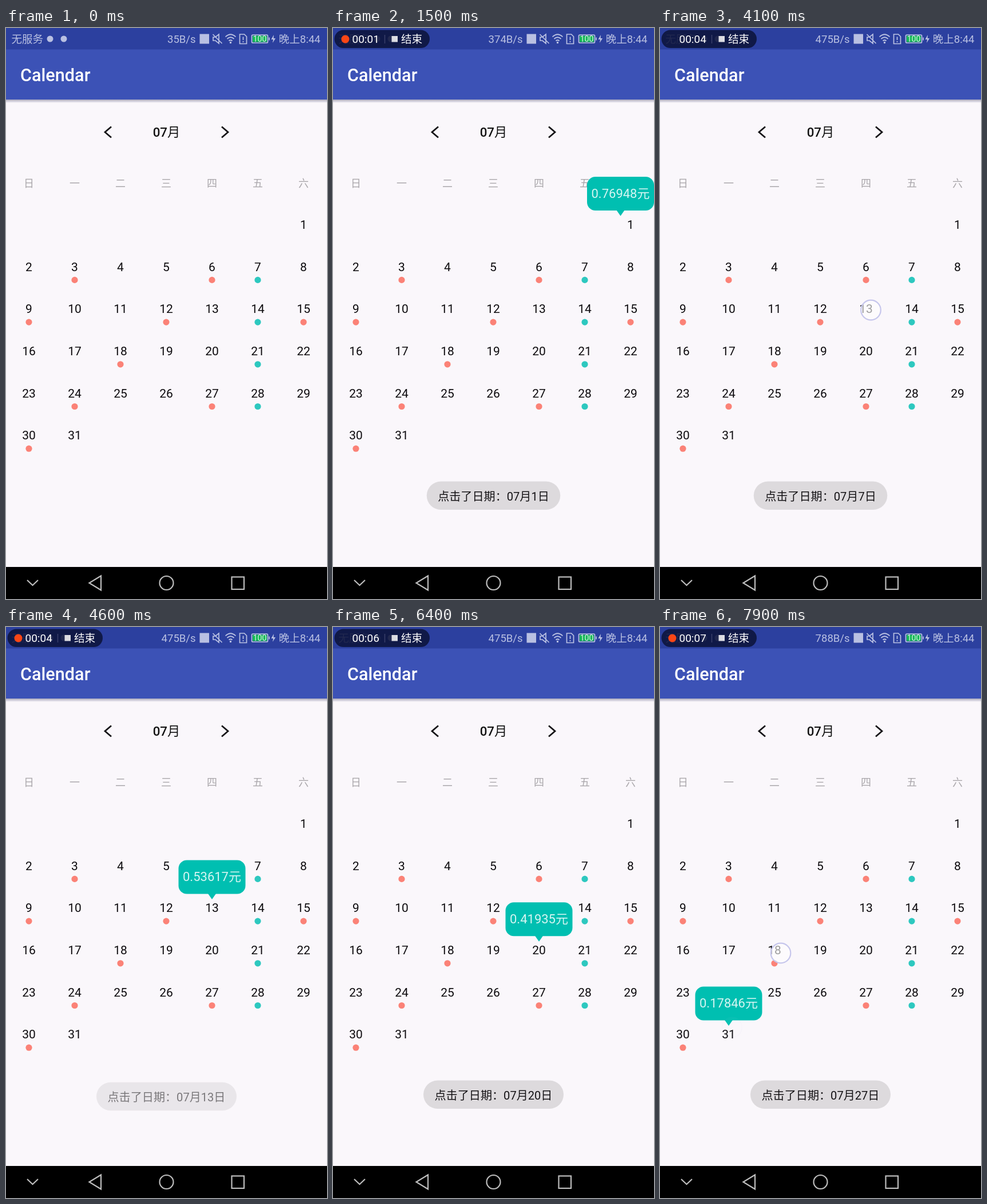
Recreate the animation shown at these times as an HTML page. Size 561 by 998 pixels, loop 8 s.

```html
<!DOCTYPE html>
<html lang="zh-CN">
<head>
<meta charset="utf-8">
<title>Calendar</title>
<style>
  html, body { margin: 0; width: 100%; height: 100%; overflow: hidden; background: #faf7fb; }
  svg { display: block; width: 100vw; height: 100vh; }
  text { font-family: Roboto, "Noto Sans CJK SC", "Noto Sans CJK", sans-serif; }
  .mid { text-anchor: middle; }
  .end { text-anchor: end; }
  .line { fill: none; stroke: #bcc3e4; stroke-width: 1.7; }
  .nav { fill: none; stroke: #bdbdbd; stroke-width: 2.2; }
  .arrow { fill: none; stroke: #161418; stroke-width: 2.8; }
  .status { font-size: 18.5px; fill: #b9c0e2; }
</style>
</head>
<body>
<svg viewBox="0 0 561 998" xmlns="http://www.w3.org/2000/svg">
  <defs>
    <linearGradient id="shade" x2="0" y2="1">
      <stop stop-color="#8f8da6" stop-opacity=".75"/>
      <stop offset="1" stop-color="#8f8da6" stop-opacity="0"/>
    </linearGradient>
  </defs>
  <rect width="561" height="998" fill="#faf7fb"/>
  <rect y="125" width="561" height="6" fill="url(#shade)"/>
  <rect y="37" width="561" height="88" fill="#3c52b6"/>
  <rect width="561" height="37.5" fill="#2c409f"/>

  <g class="status">
    <text x="9.500" y="26">无服务</text>
    <circle cx="77" cy="19" r="5.500"/>
    <circle cx="101" cy="19" r="5.500"/>
    <text id="speed" class="end" x="331.500" y="26"></text>
    <rect x="338.500" y="10.500" width="16.500" height="17"/>
    <text class="end" x="549.500" y="26">晚上8:44</text>
  </g>
  <g class="line">
    <path d="M362 16h4l6-5v16l-6-5h-4zM361.500 11l16 16"/>
    <path d="M383.500 15.500q9-8.500 18 0M386.500 19q6-5.500 12 0M389.500 22.500q3-2.500 6 0"/>
    <circle cx="392.500" cy="25.500" r=".9"/>
    <path d="M408.500 11h8l4 4v12.500h-12zM414.500 15.500v5.500M414.500 23v2"/>
    <rect x="429.500" y="12" width="28" height="14" rx="2"/>
    <path d="M460 16.500v5"/>
  </g>
  <rect x="431" y="13.500" width="25" height="11" fill="#15b857"/>
  <text class="mid" x="443.500" y="24" font-size="14" fill="#d9f3e3">100</text>
  <path d="M468 12l-4.500 8h3.500l-1 6 5-8h-3.500z" fill="#bcc3e4"/>

  <text x="25" y="93" font-size="30.600" font-weight="500" fill="#fff">Calendar</text>
  <path class="arrow" d="M184 172.500L173 182l11 9.500M377 172.500L388 182l-11 9.500"/>
  <text class="mid" x="280.500" y="190" font-size="22.300" font-weight="500" fill="#111">07月</text>
  <g id="days"></g>

  <g id="toast">
    <rect id="toastBox" y="792.500" height="49.500" rx="24.700" fill="#dddadd"/>
    <text id="toastText" class="mid" x="280.500" y="825.500" font-size="20.100" fill="#141215"></text>
  </g>
  <g id="bubble">
    <rect width="117" height="59" rx="14.500" fill="#00bfb1"/>
    <path d="M51.500 58.500h14l-7 10z" fill="#00bfb1"/>
    <text id="amount" class="mid" x="58.500" y="36.500" font-size="22" fill="#d6f5f2"></text>
  </g>

  <rect y="942" width="561" height="56"/>
  <g class="nav">
    <path d="M37 965l9.500 9 9.500-9M166 957.500v25L145.500 970z"/>
    <circle cx="280.500" cy="970" r="12"/>
    <rect x="394.500" y="959.500" width="21.500" height="21.500"/>
  </g>

  <g id="recorder">
    <rect x="2.500" y="3.500" width="166.500" height="31.500" rx="15.700" fill="#0d143c" opacity=".88"/>
    <circle id="recDot" cx="21.500" cy="19.500" r="7" fill="#fa4616"/>
    <text id="clock" x="33.500" y="26" font-size="19" fill="#fff"></text>
    <path d="M90.500 12v15" stroke="#39406a" stroke-width="1.500"/>
    <rect x="102.500" y="14" width="10.500" height="10.500" fill="#dcdce2"/>
    <text x="119" y="26" font-size="18.600" fill="#fff">结束</text>
  </g>
  <g id="touches"></g>
</svg>
<script>
const LOOP = 8000;
const FIRST_COLUMN = 6;
const $ = id => document.getElementById(id);

// Day taps open a bubble that stays until the next outside press.
const bubbles = [
  { day: 1, amount: '0.76948', from: 950, to: 2000 },
  { day: 7, amount: '0.20162', from: 2800, to: 3300 },
  { day: 13, amount: '0.53617', from: 4200, to: 5150 },
  { day: 20, amount: '0.41935', from: 6000, to: 6450 },
  { day: 27, amount: '0.87862', from: 7030, to: 7350 },
  { day: 31, amount: '0.17846', from: 7690, to: LOOP + 200 }
];
const toasts = [
  { day: 1, from: 950, to: 2650 },
  { day: 7, from: 3000, to: 4200 },
  { day: 13, from: 4490, to: 5720 },
  { day: 20, from: 6020, to: 6930 },
  { day: 27, from: 7230, to: LOOP + 200 }
];
const touches = [
  { x: 522, y: 346, from: 780, to: 950 },
  { x: 158, y: 967, from: 1880, to: 2050 },
  { x: 438, y: 421, from: 2600, to: 2800 },
  { x: 449, y: 440, from: 3300, to: 3480 },
  { x: 368.5, y: 493, from: 3960, to: 4200 },
  { x: 373, y: 442, from: 5130, to: 5302 },
  { x: 368, y: 568, from: 5800, to: 6000 },
  { x: 372, y: 520, from: 6430, to: 6560 },
  { x: 366, y: 641, from: 6820, to: 7030 },
  { x: 372, y: 600, from: 7300, to: 7400 },
  { x: 126, y: 700, from: 7550, to: 7690 },
  { x: 211, y: 570, from: 7780, to: LOOP + 100 }
];
const ticks = [200, 1000, 1950, 2950, 4050, 5100, 6100, 7150];
const speeds = [[0, 35], [1000, 374], [4000, 475], [7000, 788]];

const clamp = v => Math.max(0, Math.min(1, v));
const envelope = (t, { from, to }, rise, fall) =>
  Math.min(clamp((t - from) / rise), clamp(1 - (t - to) / fall));
const cell = day => {
  const index = day - 1 + FIRST_COLUMN;
  return { x: 40 + 80 * (index % 7), y: 343.3 + 73.7 * Math.floor(index / 7) };
};

function add(parent, tag, attrs, text = '') {
  const node = document.createElementNS('http://www.w3.org/2000/svg', tag);
  for (const key in attrs) node.setAttribute(key, attrs[key]);
  node.textContent = text;
  return parent.appendChild(node);
}

function setText(id, value) {
  const node = $(id);
  if (node.textContent !== value) node.textContent = value;
}

[...'日一二三四五六'].forEach((name, i) =>
  add($('days'), 'text', { class: 'mid', x: 40 + 80 * i, y: 277.5, 'font-size': 18, fill: '#a9a6aa' }, name));

for (let day = 1; day <= 31; day++) {
  const { x, y } = cell(day);
  add($('days'), 'text', { class: 'mid', x, y: y + 7.5, 'font-size': 21, fill: '#0c0a0d' }, day);
  const color = day % 7 === 0 ? '#2dc8bf' : day % 3 === 0 ? '#fb8277' : null;
  if (color) add($('days'), 'circle', { cx: x, cy: y + 23.4, r: 5.6, fill: color });
}

for (const touch of touches) {
  touch.node = add($('touches'), 'circle', {
    cx: touch.x, cy: touch.y, r: 17.3, fill: '#fff', 'fill-opacity': 0.6, stroke: '#c6c6ec', 'stroke-width': 2.2
  });
}

function drawBubble(t) {
  const item = bubbles.find(b => t >= b.from && t < b.to + 60);
  $('bubble').setAttribute('opacity', item ? envelope(t, item, 50, 60) : 0);
  if (!item) return;
  const { x, y } = cell(item.day);
  $('bubble').setAttribute('transform', `translate(${Math.min(x - 58.5, 444)} ${y - 83.2})`);
  setText('amount', item.amount + '元');
}

function drawToast(t) {
  const item = toasts.find(m => t >= m.from && t < m.to + 290);
  const alpha = item ? envelope(t, item, 200, 290) : 0;
  $('toast').setAttribute('opacity', alpha);
  if (!item) return;
  const width = item.day < 10 ? 233.5 : 245;
  $('toast').setAttribute('transform', `translate(0 ${7.3 * (1 - alpha)})`);
  $('toastBox').setAttribute('x', 280.5 - width / 2);
  $('toastBox').setAttribute('width', width);
  setText('toastText', `点击了日期：07月${item.day}日`);
}

function drawStatus(t) {
  const second = Math.max(0, ticks.filter(at => at <= t).length - 1);
  $('recorder').setAttribute('opacity', clamp((t - 90) / 200));
  $('recDot').setAttribute('opacity', t - ticks[second] >= 450 ? 1 : 0);
  setText('clock', '00:0' + second);
  setText('speed', speeds.filter(([at]) => at <= t).pop()[1] + 'B/s');
}

function render(t) {
  drawStatus(t);
  drawBubble(t);
  drawToast(t);
  for (const touch of touches) touch.node.setAttribute('opacity', envelope(t, touch, 80, 220));
}

const start = performance.now();
function frame() {
  render((performance.now() - start) % LOOP);
  requestAnimationFrame(frame);
}
frame();
</script>
</body>
</html>
```
